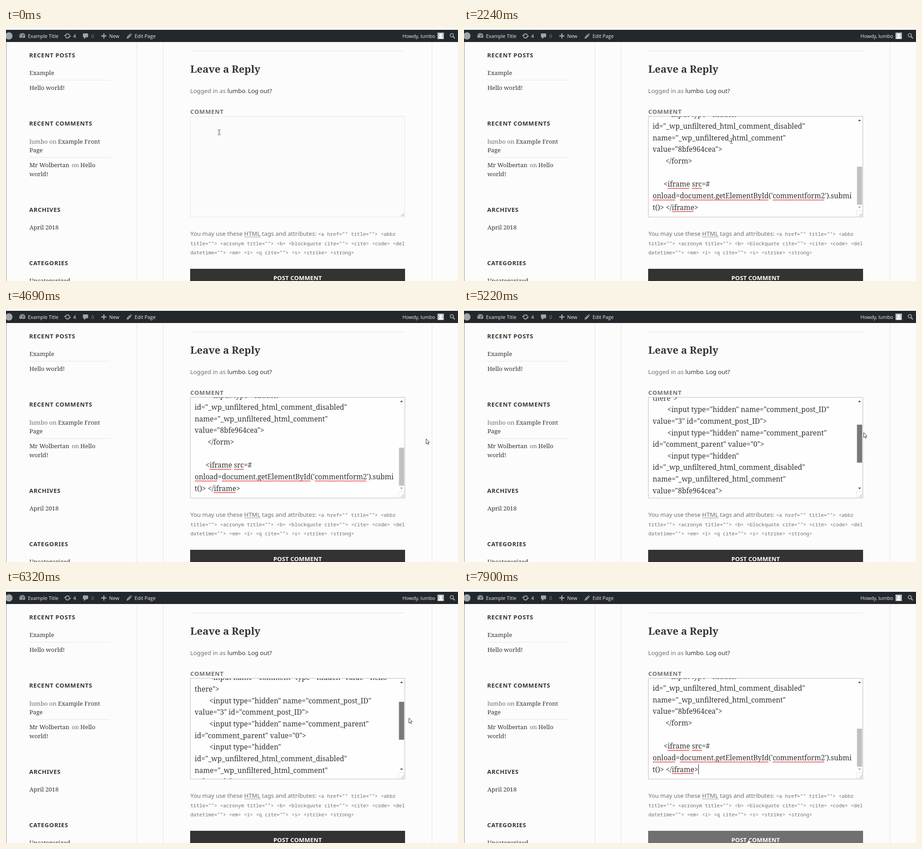
An HTML page with a canvas that plays this animation: 999 by 560 pixels, repeating every 8000 ms.

```html
<!DOCTYPE html>
<html lang="en">
<head>
<meta charset="utf-8">
<title>Leave a Reply</title>
<style>
html, body { margin: 0; width: 100%; height: 100%; overflow: hidden; background: #fcfcfc; }
canvas { display: block; }
</style>
</head>
<body>
<canvas id="stage" width="999" height="560"></canvas>
<script>
const ctx = document.getElementById('stage').getContext('2d');
const LOOP = 8000;
const SANS = '"Noto Sans", sans-serif';
const SERIF = '"Noto Serif", serif';
const FONT = {
  bar: '10.8px "Open Sans", sans-serif',
  body: '13.15px ' + SANS,
  label: 'bold 13.15px ' + SANS,
  side: '13.15px ' + SERIF,
  title: 'bold 22.2px ' + SERIF,
  area: '15.6px ' + SERIF,
  code: '10.97px "Noto Sans Mono", monospace'
};
const DARK = '#333', GREY = '#707070', RULE = '#e6e6e6', ICON = '#a0a5aa';

const LINE = 25.65, BOTTOM = 402.5, PASTE = 1840, FOCUS = 560;
// Words between bars are marked by the spell checker.
const LINES = [
  '        <input name="comment" type="hidden" value="hello',
  'there">',
  '        <input type="hidden" name="comment_post_ID"',
  'value="3" id="comment_post_ID">',
  '        <input type="hidden" name="comment_parent"',
  'id="comment_parent" value="0">',
  '        <input type="hidden"',
  'id="_wp_unfiltered_html_comment_disabled"',
  'name="_wp_unfiltered_html_comment"',
  'value="8bfe964cea">',
  '       </form>',
  '',
  '      <|iframe| |src|=#',
  "|onload|=|document.getElementById|('|commentform2|').submi",
  't()> </|iframe|>'
];

// Pointer stops: time, x, y, scroll distance from the end.
const STOPS = [
  [0, 471, 231], [130, 463, 225], [260, 455, 220],
  [2240, 591, 250], [2390, 596, 300], [2530, 602, 390], [2670, 608, 480],
  [2810, 613, 545], [2960, 614, 552],
  [4290, 650, 520], [4423, 735, 450], [4556, 850, 350], [4689, 928, 287],
  [4822, 900, 325], [4955, 875, 346], [5087, 879, 318, 40], [5220, 883, 273, 133.5],
  [5350, 885, 273, 180], [5630, 887, 275, 182], [5910, 888, 278, 174],
  [6180, 889, 281, 164], [6320, 890, 283, 156],
  [6450, 891, 292, 132], [6590, 891, 308, 88], [6730, 892, 328, 35], [6880, 892, 341],
  [7040, 862, 395], [7190, 785, 468], [7330, 690, 528], [7480, 634, 549],
  [7610, 631, 550], [7760, 629, 551], [7900, 628, 550]
];
const BLINKS = [560, 1120, 1690, 2240, 2810, 3250, 3700, 4290, 4822, 5350, 5910, 6450, 6880, 7480, 7900];

function text(str, x, y, font, color, spacing = 0) {
  ctx.font = FONT[font];
  ctx.letterSpacing = spacing + 'px';
  ctx.fillStyle = color;
  ctx.fillText(str, x, y);
}

function rect(x, y, w, h, color) {
  ctx.fillStyle = color;
  ctx.fillRect(x, y, w, h);
}

function poly(points, fill, stroke) {
  ctx.beginPath();
  for (let i = 0; i < points.length; i += 2) ctx.lineTo(points[i], points[i + 1]);
  ctx.closePath();
  if (fill) { ctx.fillStyle = fill; ctx.fill(); }
  if (stroke) { ctx.strokeStyle = stroke; ctx.lineWidth = 1; ctx.stroke(); }
}

function disc(x, y, r, color) {
  ctx.fillStyle = color;
  ctx.beginPath();
  ctx.arc(x, y, r, 0, 7);
  ctx.fill();
}

function arc(x, y, r, from, to, color, width) {
  ctx.strokeStyle = color;
  ctx.lineWidth = width;
  ctx.beginPath();
  ctx.arc(x, y, r, from, to);
  ctx.stroke();
}

function line(x1, y1, x2, y2, color, width) {
  ctx.strokeStyle = color;
  ctx.lineWidth = width;
  ctx.beginPath();
  ctx.moveTo(x1, y1);
  ctx.lineTo(x2, y2);
  ctx.stroke();
}

function drawBar() {
  rect(0, 0, 999, 4, '#f9fdfc');
  rect(0, 4, 999, 27, '#23282d');
  disc(6.5, 17.5, 8, ICON);

  // Dashboard gauge
  ctx.fillStyle = ICON;
  ctx.beginPath();
  ctx.arc(36, 18, 6.7, 2.6, 0.54);
  ctx.closePath();
  ctx.fill();
  for (const a of [3.3, 4, 4.71, 6.1]) disc(36 + 4.6 * Math.cos(a), 18 + 4.6 * Math.sin(a), 0.9, '#23282d');
  line(35.6, 20, 39, 14.5, '#23282d', 1.5);
  text('Example Title', 48.5, 21.5, 'bar', '#eee');

  // Update arrows
  arc(136, 17.5, 4.6, 3.5, 5.9, ICON, 2);
  arc(136, 17.5, 4.6, 0.4, 2.75, ICON, 2);
  poly([138, 17, 144, 17, 141, 20.5], ICON);
  poly([128, 18, 134, 18, 131, 14.5], ICON);
  text('4', 148.5, 21.5, 'bar', '#eee');

  // Comment bubble
  ctx.fillStyle = ICON;
  ctx.beginPath();
  ctx.roundRect(170, 12, 11.5, 8.5, 1.5);
  ctx.fill();
  poly([172.5, 20, 177, 20, 172.5, 24.5], ICON);
  text('0', 188.5, 21.5, 'bar', '#84898e');

  rect(210.5, 16.3, 11.5, 2.6, ICON);
  rect(215, 12, 2.6, 11.2, ICON);
  text('New', 228, 21.5, 'bar', '#eee');

  poly([266.5, 23.5, 267.6, 19.3, 273.5, 13.4, 276.7, 16.6, 270.8, 22.4], ICON);
  poly([274.3, 12.6, 275.4, 11.6, 278.4, 14.6, 277.4, 15.8], ICON);
  line(268.6, 21.2, 274.6, 15.2, '#23282d', 0.8);
  text('Edit Page', 284.3, 21.5, 'bar', '#eee');

  text('Howdy, lumbo', 876.3, 21.5, 'bar', '#eee');
  rect(953.5, 10, 14.5, 14.5, '#9a9da0');
  rect(954.5, 11, 12.5, 12.5, '#c9cacb');
  disc(960.7, 15.7, 3, '#fff');
  ctx.fillStyle = '#fff';
  ctx.beginPath();
  ctx.ellipse(960.7, 23.5, 5.2, 4.3, 0, Math.PI, 0);
  ctx.fill();

  arc(985.3, 16, 3.6, 0, 7, ICON, 1.8);
  line(988, 18.8, 992, 22.8, ICON, 2.4);
}

function drawSidebar() {
  const head = (str, y) => text(str, 51.2, y, 'label', DARK, 0.67);
  const item = (str, x, y, color = DARK) => text(str, x, y, 'side', color);
  head('RECENT POSTS', 64.5);
  item('Example', 51.7, 104);
  rect(52, 115, 178, 1, RULE);
  item('Hello world!', 51.7, 136.7);
  head('RECENT COMMENTS', 216);
  item('lumbo on', 51.7, 255.5, GREY);
  item('Example Front', 115, 255.5);
  item('Page', 51.7, 275.3);
  rect(52, 286, 178, 1, RULE);
  item('Mr Wolbertan', 51.7, 308);
  item('on', 145.2, 308, GREY);
  item('Hello', 164.3, 308);
  item('world!', 51.7, 327.7);
  head('ARCHIVES', 406.5);
  item('April 2018', 51.7, 446.3);
  head('CATEGORIES', 525);
  item('Uncategorized', 51.7, 564);
}

function drawPage(hover) {
  rect(0, 0, 999, 560, '#fcfcfc');
  rect(0, 31, 1, 529, '#8e8e8e');
  for (const x of [289, 347, 941]) rect(x, 31, 1, 529, '#e3e3e3');
  drawBar();
  drawSidebar();

  rect(408, 50, 474, 1, '#e3e3e3');
  text('Leave a Reply', 407.3, 99, 'title', DARK);
  text('Logged in as', 407, 144, 'body', GREY);
  text('lumbo', 489.3, 144, 'body', DARK);
  text('.', 528.3, 144, 'body', GREY);
  text('Log out?', 535, 144, 'body', DARK);
  text('COMMENT', 407.3, 190, 'label', GREY, 0.72);

  text('You may use these HTML tags and attributes:', 407.6, 460, 'body', GREY);
  ctx.setLineDash([1, 1]);
  line(527, 462.5, 563, 462.5, DARK, 1);
  ctx.setLineDash([]);
  text('<a href="" title=""> <abbr', 690, 460, 'code', GREY);
  text('title=""> <acronym title=""> <b> <blockquote cite=""> <cite> <code> <del', 407.5, 480.5, 'code', GREY);
  text('datetime=""> <em> <i> <q cite=""> <s> <strike> <strong>', 407.5, 501, 'code', GREY);

  rect(407, 533, 475, 27, hover ? GREY : DARK);
  text('POST COMMENT', 591, 557.5, 'label', '#fff', 0.1);
}

function squiggle(x, y, w) {
  ctx.strokeStyle = '#f03a3a';
  ctx.lineWidth = 1.1;
  ctx.beginPath();
  for (let i = 0; i <= w; i += 2) ctx.lineTo(x + i, y + (i % 4 ? 1 : -0.6));
  ctx.stroke();
}

function drawLine(str, y) {
  let x = 417;
  str.split('|').forEach((part, i) => {
    text(part, x, y, 'area', DARK);
    const w = ctx.measureText(part).width;
    if (i % 2) squiggle(x, y + 3.6, w);
    x += w;
  });
  return x;
}

function drawScrollbar(scroll, active) {
  rect(867, 196, 14, 222, '#fefefe');
  poly([871, 206, 877.4, 206, 874.2, 202.3], '#505050');
  poly([871, 395.3, 877.4, 395.3, 874.2, 399], scroll ? '#505050' : '#a3a3a3');
  rect(868.5, 307 - scroll / 2.62, 11.5, 84, active ? '#787878' : '#c1c1c1');
  rect(867, 404, 14, 14, '#fff');
  rect(867, 404, 14, 1, '#e2e2e2');
  rect(867, 404, 1, 14, '#e2e2e2');
}

function drawArea(t, scroll, active, caret) {
  const focus = t >= FOCUS, pasted = t >= PASTE;
  rect(407, 195, 475, 224, focus ? '#bdbdbd' : '#e6e6e6');
  rect(408, 196, 473, 222, focus ? '#fefefe' : '#fbfbfb');
  ctx.save();
  ctx.beginPath();
  ctx.rect(408, 196, 473, 222);
  ctx.clip();
  let x = 416.2, y = 206;
  if (pasted) {
    LINES.forEach((str, i) => {
      x = drawLine(str, BOTTOM + scroll - (LINES.length - 1 - i) * LINE);
    });
    y = 386 + scroll;
  }
  if (caret) rect(Math.round(x), y, 1, 22, '#222');
  if (pasted) drawScrollbar(scroll, active);
  line(873, 417, 880, 410, '#8a8a8a', 1);
  line(877, 417, 880, 414, '#8a8a8a', 1);
  ctx.restore();
}

function drawBeam(x, y) {
  const c = '#444';
  line(x, y - 5, x, y + 5, c, 1.2);
  for (const s of [-1, 1]) {
    line(x - 3, y + 5.5 * s, x - 0.6, y + 5.5 * s, c, 1);
    line(x + 0.6, y + 5.5 * s, x + 3, y + 5.5 * s, c, 1);
  }
}

function drawArrow(x, y) {
  poly([0, 0, 0, 11, 2.5, 8.8, 4.2, 12.4, 5.9, 11.6, 4.3, 8.1, 7.4, 7.8]
    .map((v, i) => v + (i % 2 ? y : x) + 0.5), '#fff', '#333');
}

function drawHand(x, y) {
  poly([-1, 0, 1, 0, 1, 4, 5.5, 5.2, 5.8, 8.5, 4.4, 12.5, -1.6, 12.5, -4.6, 7.5, -3.4, 6.4, -1, 8]
    .map((v, i) => v + (i % 2 ? y : x)), '#fff', '#222');
}

function lastStop(t) {
  let stop = STOPS[0];
  for (const s of STOPS) if (s[0] <= t) stop = s;
  return stop;
}

function draw(t) {
  const [, x, y, scroll = 0] = lastStop(t);
  const hover = y > 533 && x > 407 && x < 882;
  const dragging = t >= 4955 && t < 7040;
  const caret = BLINKS.filter(b => b <= t).length % 2 === 1;
  drawPage(hover);
  drawArea(t, scroll, dragging, caret);
  const inArea = x > 408 && x < 867 && y > 196 && y < 418;
  const overNotes = y > 448 && y < 504 && x < 882;
  if (hover) drawHand(x, y);
  else if (inArea || overNotes) drawBeam(x, y);
  else drawArrow(x, y);
}

const start = performance.now();
function tick() {
  draw((performance.now() - start) % LOOP);
  requestAnimationFrame(tick);
}
tick();
</script>
</body>
</html>
```
